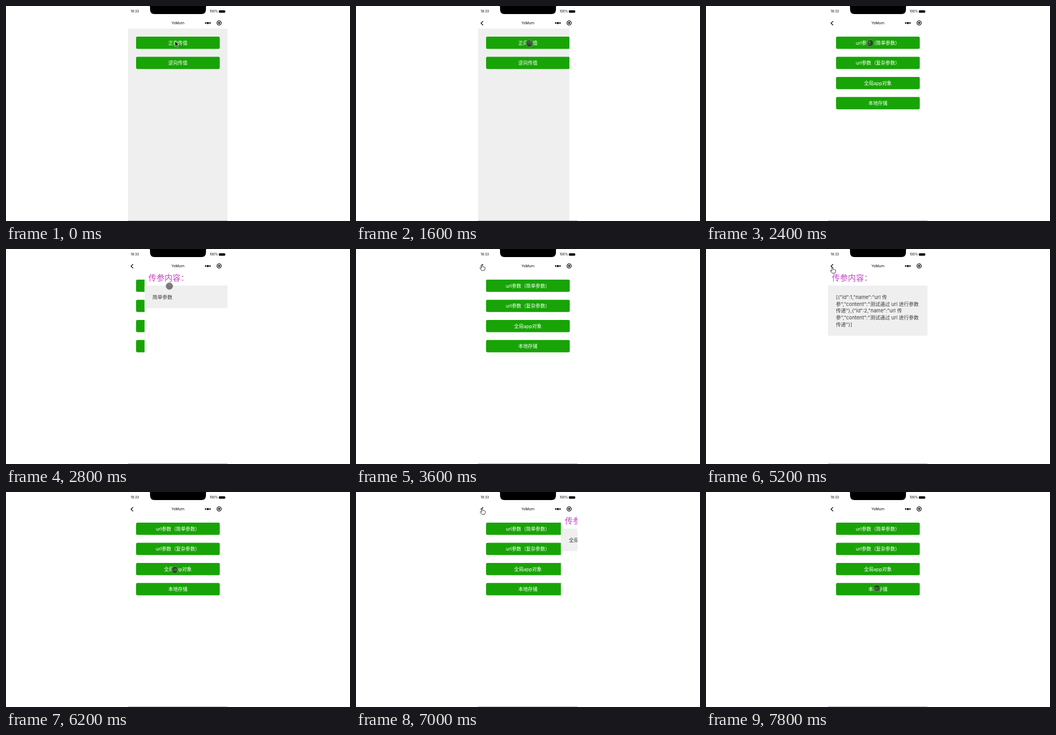
These frames come from a looping animation (640x400 px, 8 s). An HTML page:

```html
<!DOCTYPE html>
<html lang="zh-CN">
<head>
<meta charset="utf-8">
<title>页面传值</title>
<style>
html, body { margin: 0; width: 100%; height: 100%; overflow: hidden; background: #fff; }
svg { display: block; width: 100vw; height: 100vh; font-family: Inter, "Noto Sans CJK SC", "Noto Sans CJK", sans-serif; }
.button rect { fill: #18a406; }
.button text { fill: #fff; font-size: 8.9px; text-anchor: middle; }
.heading { fill: #c445c4; font-size: 14.9px; }
.content { fill: #3c3c3c; font-size: 9.25px; white-space: pre; }
</style>
</head>
<body>
<svg viewBox="0 0 640 400">
  <defs>
    <clipPath id="screen"><rect x="227" y="42" width="185" height="358"/></clipPath>
  </defs>
  <rect width="640" height="400" fill="#fff"/>
  <g clip-path="url(#screen)">
    <g id="home"><rect x="227" y="42" width="185" height="358" fill="#efefef"/></g>
    <g id="list"><rect x="227" y="42" width="185" height="358" fill="#fff"/></g>
    <g id="result">
      <rect x="227" y="42" width="185" height="358" fill="#fff"/>
      <text class="heading" x="234.3" y="58.5">传参内容：</text>
      <rect id="panel" x="227" y="68" width="185" fill="#efefef"/>
      <g id="lines"></g>
    </g>
  </g>
  <path d="M227 399.5H412" stroke="#b4b4b4"/>

  <path d="M267 0H373Q372 .3 372 2V6.500Q372 15 363.500 15H276.500Q268 15 268 6.500V2Q268 .3 267 0Z"/>
  <text x="232" y="12.200" font-size="6">18:33</text>
  <text x="379" y="12.100" font-size="5.800">100%</text>
  <rect x="396" y="7.900" width="11.600" height="4.600" rx="1.200"/>
  <path d="M408.200 9.200Q409.300 10.200 408.200 11.200Z"/>
  <text x="319.800" y="33.900" font-size="6.600" text-anchor="middle">YoMurn</text>
  <circle cx="371.500" cy="31.700" r="1.400"/>
  <circle cx="375.500" cy="31.700" r="2"/>
  <circle cx="379.500" cy="31.700" r="1.400"/>
  <circle cx="396.500" cy="31.500" r="3.900" fill="none" stroke="#000" stroke-width="1.300"/>
  <circle cx="396.500" cy="31.500" r="1.800"/>
  <path id="back" d="M236.500 28.200L232.600 32L236.500 35.800" fill="none" stroke="#000" stroke-width="1.200"/>

  <g id="cursor">
    <path id="arrow" d="M0 0V9.500L2.200 7.500L3.800 11L5.500 10.200L3.900 6.900H6.800Z" stroke="#fff" stroke-width=".7"/>
    <circle id="touch" r="6.300" fill="#000" fill-opacity=".5" stroke="#8c8c8c" stroke-width=".9"/>
    <path id="hand" d="M-1 .5Q0-.5 1 .5L1.300 4Q2.300 3.400 3 4.300Q4.100 3.800 4.700 4.800Q6.200 4.500 6.300 6L5.700 9L4.800 11H-.2L-3.500 6.900Q-3.500 5.500-2.200 5.800L-.7 7Z" fill="#fff" stroke="#222" stroke-width=".9" stroke-linejoin="round"/>
  </g>
</svg>
<script>
const LOOP = 8000, STEP = 200, WIDTH = 185, SLIDE = 400;
const $ = id => document.getElementById(id);

function add(parent, tag, attrs, text = '') {
  const el = document.createElementNS('http://www.w3.org/2000/svg', tag);
  for (const key in attrs) el.setAttribute(key, attrs[key]);
  el.textContent = text;
  return parent.appendChild(el);
}

function addButtons(page, labels) {
  labels.forEach((label, i) => {
    const y = 57 + i * 37.45;
    const g = add(page, 'g', { class: 'button' });
    add(g, 'rect', { x: 242, y, width: 155.7, height: 22.8, rx: 2.4 });
    add(g, 'text', { x: 319.8, y: y + 14.6 }, label);
  });
}
addButtons($('home'), ['正向传值', '逆向传值']);
addButtons($('list'), ['url参数（简单参数）', 'url参数（复杂参数）', '全局app对象', '本地存储']);

const LIST_OPEN = 1589;
const visits = [
  { open: 2620, close: 3220, lines: ['简单参数'] },
  { open: 4220, close: 5420, lines: [
    '[{"id":1,"name":"url 传',
    '参","content":"测试通过 url 进行参数',
    '传递"},{"id":2,"name":"url 传',
    '参","content":"测试通过 url 进行参数',
    '传递"}]'] },
  { open: 6220, close: 6820, lines: ['全局app对象'] }
];

// Pointer stops: time, x, y
const stops = [
  [0, 314.5, 65.5], [200, 316, 76], [600, 322, 105], [1000, 322, 72],
  [1200, 322, 72], [1400, 323, 70], [1800, 322, 69], [2400, 305, 69],
  [2800, 304, 69], [3200, 234, 30], [3600, 234, 29], [3700, 236, 32],
  [4100, 312, 106], [4600, 311, 107], [5200, 235, 34], [5600, 234, 32],
  [6100, 314, 144], [6200, 314, 145], [6400, 314, 145], [6800, 235, 31],
  [7200, 234, 30], [7300, 235, 32], [7700, 316, 176], [7800, 318, 179]
];

function pointerAt(t) {
  const i = stops.findIndex(s => s[0] > t);
  if (i < 0) return stops[stops.length - 1].slice(1);
  const [t0, x0, y0] = stops[i - 1], [t1, x1, y1] = stops[i];
  const p = (t - t0) / (t1 - t0), e = p * p * (3 - 2 * p);
  return [x0 + (x1 - x0) * e, y0 + (y1 - y0) * e];
}

// Progress of a page slide that decelerates
function slide(t, start) {
  const p = Math.min(1, Math.max(0, (t - start) / SLIDE));
  return 1 - (1 - p) ** 3;
}

const show = (id, on) => $(id).setAttribute('visibility', on ? 'visible' : 'hidden');
const place = (id, x, y = 0) => $(id).setAttribute('transform', `translate(${x.toFixed(2)} ${y.toFixed(2)})`);

let current;
function fillResult(visit) {
  if (visit === current) return;
  current = visit;
  $('panel').setAttribute('height', 29.3 + visit.lines.length * 12.8);
  $('lines').replaceChildren();
  visit.lines.forEach((line, i) =>
    add($('lines'), 'text', { class: 'content', x: 241.8, y: 92.7 + i * 12.85 }, line));
}

function render(t) {
  place('list', WIDTH * (1 - slide(t, LIST_OPEN)));
  show('back', t >= LIST_OPEN);

  const visit = visits.filter(v => t >= v.open).pop() || visits[0];
  fillResult(visit);
  place('result', WIDTH * (1 - slide(t, visit.open) + slide(t, visit.close)));

  const [x, y] = pointerAt(t);
  const kind = t < STEP ? 'arrow' : y < 42 ? 'hand' : 'touch';
  place('cursor', x, y);
  for (const id of ['arrow', 'touch', 'hand']) show(id, id === kind);
}

const begin = performance.now();
function tick() {
  const t = (performance.now() - begin) % LOOP;
  render(Math.floor(t / STEP) * STEP);
  requestAnimationFrame(tick);
}
tick();
</script>
</body>
</html>
```
